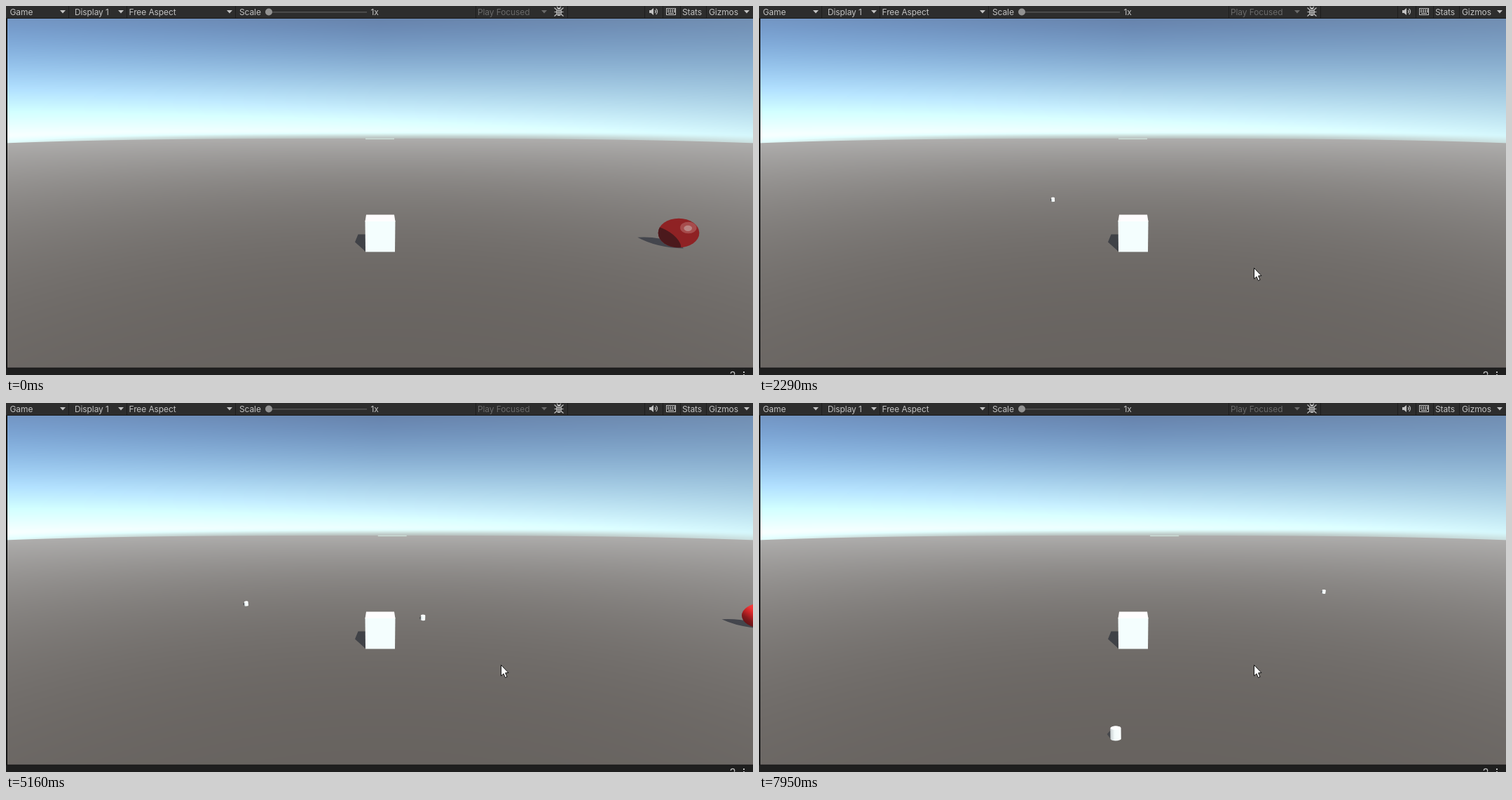
These frames come from a looping animation (1066 px wide and 526 px high, 8 s). An HTML page with a canvas:

```html
<!DOCTYPE html>
<html lang="en">
<head>
<meta charset="utf-8">
<title>Game view</title>
<style>
  html, body { margin: 0; width: 100%; height: 100%; overflow: hidden; background: #1e1e1e; }
  canvas { display: block; }
</style>
</head>
<body>
<canvas id="view" width="1066" height="526"></canvas>
<script>
const W = 1066, H = 526, LOOP = 8000;
const TOP = 18, BOTTOM = 516;
const MID = 533, HORIZON = 189, FOCAL = 431;
const ctx = document.getElementById('view').getContext('2d');

const mix = (a, b, k) => a + (b - a) * k;
const clamp = k => Math.min(1, Math.max(0, k));
const smooth = k => k * k * (3 - 2 * k);

function poly(g, color, ...pts) {
  g.fillStyle = color;
  g.beginPath();
  for (let i = 0; i < pts.length; i += 2) g.lineTo(pts[i], pts[i + 1]);
  g.closePath();
  g.fill();
}

function oval(g, color, x, y, rx, ry = rx) {
  g.fillStyle = color;
  g.beginPath();
  g.ellipse(x, y, rx, ry, 0, 0, 7);
  g.fill();
}

function box(g, color, x, y, w, h) {
  g.fillStyle = color;
  g.fillRect(x, y, w, h);
}

// Height 0 is the top of the view, 1 the horizon; side runs from -1 to 1.
function skyColor(height, side) {
  const left = Math.max(0, -side), right = Math.max(0, side);
  const gain = 1 - .25 * right;
  const haze = smooth(clamp((height - .93) / .08)) * (.85 - .45 * side * side);
  return [
    mix(104 + 12 * left + 10 * right + 145 * gain * height ** 1.5, 168, haze),
    mix(132 + 19 * left + 11 * right + 150 * gain * height ** 1.25, 172, haze),
    mix(172 + 24 * left + 6 * right + 105 * gain * height, 170, haze)
  ].map(c => Math.min(255, c));
}

function groundColor(drop, side) {
  const light = Math.exp(-drop / (84 * (1 + .5 * side * side)));
  return [102 + 72 * light, 97.5 + 75.5 * light, 94 + 78 * light];
}

function drawWorld(g) {
  const img = g.createImageData(W, BOTTOM - TOP);
  for (let x = 0; x < W; x++) {
    const side = (x - MID) / MID;
    const edge = 188.4 + 6.5 * Math.abs(side) ** 3;
    for (let y = TOP; y < BOTTOM; y++) {
      const sky = skyColor(clamp((y - TOP) / (edge - TOP)), side);
      const land = groundColor(Math.max(0, y - edge), side);
      const cover = clamp(y - edge + .5), at = ((y - TOP) * W + x) * 4;
      for (let i = 0; i < 3; i++) img.data[at + i] = mix(sky[i], land[i], cover);
      img.data[at + 3] = 255;
    }
  }
  g.putImageData(img, 0, TOP);
}

function drawBar(g) {
  const light = '#c2c2c2', dim = '#696969';
  box(g, '#2d2d2d', 0, 0, W, 17);
  box(g, '#191919', 0, 17, W, 1);
  box(g, '#141414', 0, TOP, 2, BOTTOM - TOP);
  for (const x of [89, 172, 327, 670, 801, 911, 937, 962, 999]) box(g, '#1d1d1d', x, 0, 1, 17);

  g.font = '12px Inter, "Liberation Sans", sans-serif';
  g.letterSpacing = '-0.1px';
  const label = (s, x, color = light) => { g.fillStyle = color; g.fillText(s, x, 13); };
  label('Game', 5.5);
  label('Display 1', 98);
  label('Free Aspect', 175.5);
  label('Scale', 333);
  label('1x', 520.5);
  label('Play Focused', 673, dim);
  label('Stats', 965);
  label('Gizmos', 1003);
  for (const x of [81, 164, 319, 768, 1057])
    poly(g, x === 768 ? dim : light, x - 4, 6, x + 4, 6, x, 10.5);

  box(g, '#555', 378, 8, 137, 1.5);
  oval(g, '#929292', 375, 8.5, 5);

  // bug
  g.strokeStyle = light;
  g.lineWidth = 1.2;
  g.beginPath();
  for (const s of [-1, 1]) {
    for (const k of [-1, 0, 1]) {
      g.moveTo(789 + s * 3, 8.5 + k * 3);
      g.lineTo(789 + s * 6.5, 8.5 + k * 6);
    }
    g.moveTo(789, 4);
    g.lineTo(789 + s * 3, 1);
  }
  g.stroke();
  oval(g, light, 789, 8.5, 4, 5.5);
  for (let i = 0; i < 3; i++) box(g, '#2d2d2d', 786, 5 + i * 2.8, 6, 1);

  // speaker
  poly(g, light, 918, 6, 920.5, 6, 924, 3, 924, 13, 920.5, 10, 918, 10);
  for (const r of [2.5, 5]) {
    g.beginPath();
    g.arc(924.5, 8, r, -.9, .9);
    g.stroke();
  }

  // keyboard
  g.lineWidth = 1;
  g.strokeRect(942.5, 3.5, 13, 9);
  for (let i = 0; i < 8; i++) box(g, light, 944 + i % 4 * 3, i < 4 ? 5 : 7.5, 2, 1.5);
  box(g, light, 945, 10, 8, 1);

  box(g, '#1f1f1f', 0, BOTTOM, W, 10);
  box(g, '#151515', 0, BOTTOM - .5, W, 1);
  g.lineWidth = 1.3;
  g.beginPath();
  g.arc(1037, 524, 2.7, Math.PI, 6.9);
  g.stroke();
  box(g, light, 1052, 521, 2, 2);
  box(g, light, 1052, 525, 2, 1);
}

// Stops are [time, x, y] on screen, joined by straight lines over the ground.
const START = 750;
const BALL = [
  [START, 960, 323.5], [1200, 848, 285], [1660, 944, 318], [2700, 1400, 320],
  [4190, 939, 290], [5160, 1079, 303], [6050, 540, 309], [6900, 1150, 306]
];
const CYLINDERS = [
  [[START, 530, 314], [1660, 518, 270], [2300, 418, 276], [3350, 530, 314],
    [4190, 513, 293], [5160, 595, 306], [7100, 660, 263], [7950, 806, 269]],
  [[3350, 530, 314], [3780, 352, 372], [4190, 424, 322], [5160, 343, 286],
    [6200, 90, 340], [7100, 163, 417], [7950, 509, 471]],
  [[5700, 527, 312], [7100, 330, 310], [7950, 531, 314]]
];

function place(stops, t) {
  let i = stops.findIndex(s => s[0] > t);
  if (i < 0) i = stops.length - 1;
  const [[t0, x0, y0], [t1, x1, y1]] = [stops[Math.max(0, i - 1)], stops[i]];
  const k = t1 > t0 ? clamp((t - t0) / (t1 - t0)) : 0;
  const z0 = 1 / (y0 - HORIZON), z1 = 1 / (y1 - HORIZON);
  const depth = mix(z0, z1, k);
  const side = mix((x0 - MID) * z0, (x1 - MID) * z1, k);
  return [MID + side / depth, HORIZON + 1 / depth];
}

const stretch = x => Math.hypot(1, (x - MID) / FOCAL);

function drawBall([x, y], idle) {
  const h = .31 * (y - HORIZON), w = h * stretch(x);
  ctx.save();
  ctx.translate(x, y);
  ctx.scale(w / 2, h / 2);

  ctx.fillStyle = '#44464d';
  ctx.beginPath();
  ctx.moveTo(-2, .3);
  ctx.quadraticCurveTo(-1.1, .2, 0, .7);
  ctx.lineTo(.24, 1.06);
  ctx.quadraticCurveTo(-1.1, 1, -2, .3);
  ctx.fill();

  if (idle) {
    oval(ctx, '#8f2224', 0, 0, 1);
    ctx.clip();
    ctx.rotate(.75);
    oval(ctx, '#4b191c', -.35, .98, 1.25, .72);
    ctx.rotate(-.75);
    oval(ctx, '#a64c4c', .47, -.36, .4);
    oval(ctx, '#b98583', .45, -.32, .2);
  } else {
    const shade = ctx.createLinearGradient(-.8, .65, .5, -.45);
    ['#5f1417', '#84181b', '#c42225', '#ee3637', '#f44141', '#e02c2d']
      .forEach((c, i, all) => shade.addColorStop(i / (all.length - 1), c));
    oval(ctx, shade, 0, 0, 1);
  }
  ctx.restore();
}

function drawCylinder([x, y]) {
  const s = y - HORIZON, h = .074 * s, r = .027 * s * stretch(x), cap = h * .13;
  ctx.save();
  ctx.translate(x, y);
  poly(ctx, '#45474b', -r * 1.6, h * .05, -r, -h * .22, 0, h * .2, 0, h * .48, -r, h * .36);
  ctx.rotate((x - MID) * .0005);
  const skin = ctx.createLinearGradient(-r, 0, r, 0);
  skin.addColorStop(0, '#c9cfd1');
  skin.addColorStop(.4, '#f3fafa');
  skin.addColorStop(1, '#fbffff');
  ctx.fillStyle = skin;
  ctx.beginPath();
  ctx.ellipse(0, cap - h / 2, r, cap, 0, Math.PI, 0);
  ctx.ellipse(0, h / 2 - cap, r, cap, 0, 0, Math.PI);
  ctx.fill();
  oval(ctx, '#fff', 0, cap - h / 2, r * .95, cap);
  ctx.restore();
}

function drawCube() {
  poly(ctx, '#404247', 498, 336.5, 502.5, 325.5, 513, 325.5, 513, 350);
  poly(ctx, '#f4fefe', 512.5, 306, 555.5, 306, 555, 350.5, 513, 350.5);
  poly(ctx, '#fffdfe', 514, 297.5, 554, 297.5, 555.5, 307, 512.5, 307);
}

function drawPointer(t) {
  if (t < 200) return;
  const k = smooth(clamp((t - 200) / 350));
  ctx.save();
  ctx.translate(mix(848, 706, k), mix(456, 373, k));
  ctx.strokeStyle = '#111';
  ctx.lineWidth = 1;
  poly(ctx, '#fff', .5, .5, .5, 16, 4, 12.8, 6.5, 18.5, 9, 17.3, 6.6, 11.8, 11, 11.5);
  ctx.stroke();
  ctx.restore();
}

const still = document.createElement('canvas');
still.width = W;
still.height = H;
const back = still.getContext('2d');
drawWorld(back);
drawBar(back);

function draw(t) {
  ctx.drawImage(still, 0, 0);
  ctx.save();
  ctx.beginPath();
  ctx.rect(2, TOP, W - 2, BOTTOM - TOP);
  ctx.clip();
  // far wall, drifting right
  box(ctx, '#cbdcd5', 513 + Math.max(0, t - 3350) * .0098, 188.5, 41, 1.6);

  const ball = place(BALL, t);
  const parts = [
    { y: 323, paint: drawCube },
    { y: ball[1], paint: () => drawBall(ball, t < START) }
  ];
  for (const stops of CYLINDERS) {
    if (t < stops[0][0]) continue;
    const p = place(stops, t);
    parts.push({ y: p[1], paint: () => drawCylinder(p) });
  }
  parts.sort((a, b) => a.y - b.y).forEach(p => p.paint());
  drawPointer(t);
  ctx.restore();
}

function tick() {
  draw(performance.now() % LOOP);
  requestAnimationFrame(tick);
}
tick();
</script>
</body>
</html>
```
